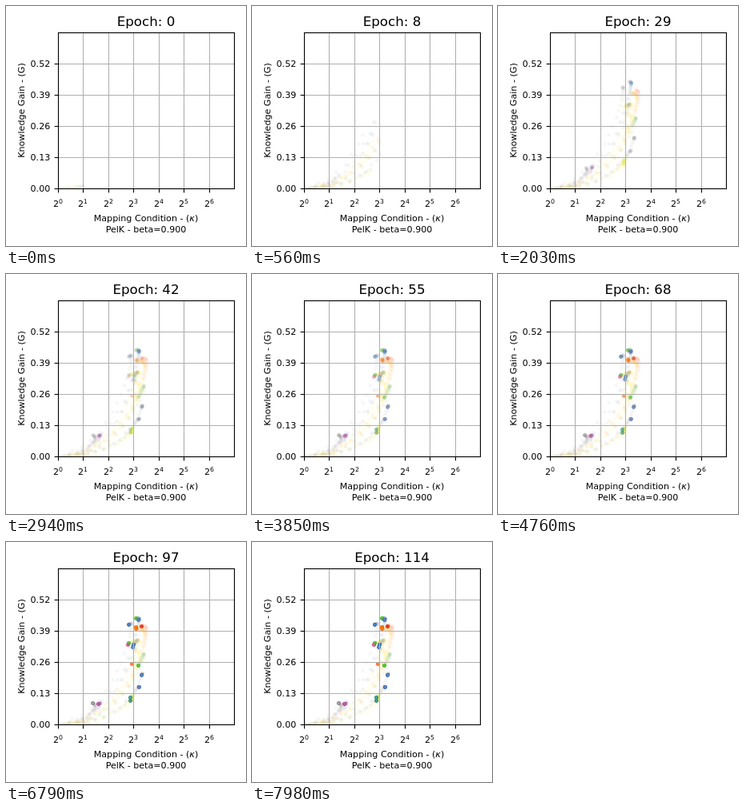
Write an HTML page with a canvas that moves like this. It is 300 px wide and 300 px high and loops after 8000 ms.

```html
<!DOCTYPE html>
<html lang="en">
<head>
<meta charset="utf-8">
<title>Knowledge gain by epoch</title>
<style>
  html, body { margin: 0; width: 100%; height: 100%; overflow: hidden; background: #fff; }
  canvas, svg { position: absolute; left: 0; top: 0; width: 300px; height: 300px; }
  text { font-family: "DejaVu Sans", sans-serif; font-size: 11.11px; text-anchor: middle; }
  .title { font-size: 16.67px; }
  .right { text-anchor: end; }
  .power { font-size: 7.78px; }
  .grid { stroke: #b0b0b0; stroke-width: 1.11; }
  .axis { stroke: #000; stroke-width: 1.11; fill: none; }
</style>
</head>
<body>
<canvas id="dots"></canvas>
<svg id="chart" viewBox="0 0 300 300">
  <text class="title" id="title" x="175" y="25">Epoch: 0</text>
  <g id="scale"></g>
  <rect class="axis" x="65.5" y="33.5" width="220" height="195"/>
  <text x="175" y="269">Mapping Condition - (<tspan font-style="italic">κ</tspan>)</text>
  <text x="175" y="283">PelK - beta=0.900</text>
  <text transform="translate(22.5 130.5) rotate(-90)">Knowledge Gain - (G)</text>
</svg>
<script>
const LOOP = 8000, STEP = 70, LAST = 114;
const BOX = { left: 65, top: 33, right: 285, bottom: 228 };

function drawScale() {
  let out = "";
  const line = (cls, x1, y1, x2, y2) =>
    out += `<line class="${cls}" x1="${x1}" y1="${y1}" x2="${x2}" y2="${y2}"/>`;
  for (let i = 0; i < 7; i++) {
    const x = Math.round(BOX.left + i * 220 / 7) + 0.5;
    if (i) line("grid", x, BOX.top, x, BOX.bottom);
    line("axis", x, 228.5, x, 233.4);
    out += `<text x="${x - 0.5}" y="251">2<tspan class="power" dy="-4.2">${i}</tspan></text>`;
  }
  for (let i = 0; i < 5; i++) {
    const y = BOX.bottom - i * 39 + 0.5;
    if (i) line("grid", BOX.left, y, BOX.right, y);
    line("axis", 60.6, y, 65.5, y);
    out += `<text class="right" x="55.3" y="${y + 3.7}">${(i * 0.13).toFixed(2)}</text>`;
  }
  document.getElementById("scale").innerHTML = out;
}

const INK = {
  red: "#e8402c", blue: "#4a8fc0", indigo: "#6a78bd", green: "#5db54c", teal: "#35a590",
  purple: "#9660ae", orange: "#ff8510", salmon: "#ff8648", yellow: "#ffee33",
  lime: "#e4f53c", pink: "#ef6390", plum: "#cf5faa", gray: "#949494"
};

// start x, peak x, peak y, resting x, resting y, trail ink, resting ink
const LAYERS = [
  [66, 113, 204, 108, 201, "gray", "gray"],
  [69, 119, 200, 115, 202, "purple", "plum"],
  [76, 160, 190, 155, 194, "lime", "teal"],
  [84, 159, 195, 155, 198, "yellow", "teal"],
  [92, 165, 179, 166, 181, "gray", "indigo"],
  [98, 171, 162, 169, 166, "gray", "indigo"],
  [88, 176, 130, 165, 154, "green", "green"],
  [74, 167, 146, 157, 152, "yellow", "salmon"],
  [82, 172, 142, 158, 131, "yellow", "indigo"],
  [70, 166, 118, 159, 128, "gray", "blue"],
  [78, 166, 120, 152, 128, "yellow", "pink"],
  [72, 173, 118, 153, 126, "yellow", "green"],
  [80, 179, 108, 162, 108, "orange", "orange"],
  [86, 178, 112, 162, 106, "yellow", "orange"],
  [94, 181, 103, 169, 105, "salmon", "red"],
  [67, 159, 98, 153, 103, "gray", "blue"],
  [90, 168, 92, 162, 95, "gray", "green"],
  [75, 167, 94, 165, 97, "blue", "indigo"]
];

const mix = (a, b, t) => a + (b - a) * t;
const settle = (t, scale, power) => 1 - Math.exp(-Math.pow(t / scale, power));
const noise = n => {
  const s = Math.sin(n * 127.1 + 11.7) * 43758.5453;
  return (s - Math.floor(s)) * 2 - 1;
};
const bezier = (a, b, c, t) => mix(mix(a, b, t), mix(b, c, t), t);

// Every layer rises along a curve to its peak, then drifts to rest.
function place([x0, px, py, fx, fy], layer, epoch) {
  const y0 = BOX.bottom - (x0 - BOX.left) * 0.1;
  const rise = settle(epoch, 7 + noise(layer), 1.6);
  const drift = settle(epoch, 25 + 2 * noise(layer + 40), 3);
  const shake = 2 * Math.exp(-epoch / 12);
  const seed = layer * 131 + epoch;
  const x = bezier(x0, mix(x0, px, 0.75), px, rise) + (fx - px) * drift;
  const y = bezier(y0, mix(y0, py, 0.15), py, rise) + (fy - py) * drift;
  return [x + shake * noise(seed), y + shake * noise(seed + 5000)];
}

const canvas = document.getElementById("dots");
const title = document.getElementById("title");
const ratio = window.devicePixelRatio || 1;
canvas.width = canvas.height = Math.round(300 * ratio);
const ctx = canvas.getContext("2d");
ctx.scale(ratio, ratio);
ctx.beginPath();
ctx.rect(BOX.left, BOX.top, 220, 195);
ctx.clip();

function draw(epoch) {
  title.textContent = "Epoch: " + epoch;
  ctx.globalAlpha = 1;
  ctx.fillStyle = "#fff";
  ctx.fillRect(0, 0, 300, 300);
  for (let e = 0; e <= epoch; e++) {
    ctx.globalAlpha = e < 24 ? 0.07 : 0.03;
    LAYERS.forEach((layer, i) => {
      const [x, y] = place(layer, i, e);
      ctx.fillStyle = INK[layer[e < 34 ? 5 : 6]];
      ctx.beginPath();
      ctx.arc(x + 0.5, y + 0.5, 2.4, 0, 2 * Math.PI);
      ctx.fill();
    });
  }
}

let shown = -1;
const start = performance.now();
function tick() {
  const time = (performance.now() - start) % LOOP;
  const epoch = Math.min(LAST, Math.floor(time / STEP));
  if (epoch !== shown) draw(shown = epoch);
  requestAnimationFrame(tick);
}
drawScale();
tick();
</script>
</body>
</html>
```
